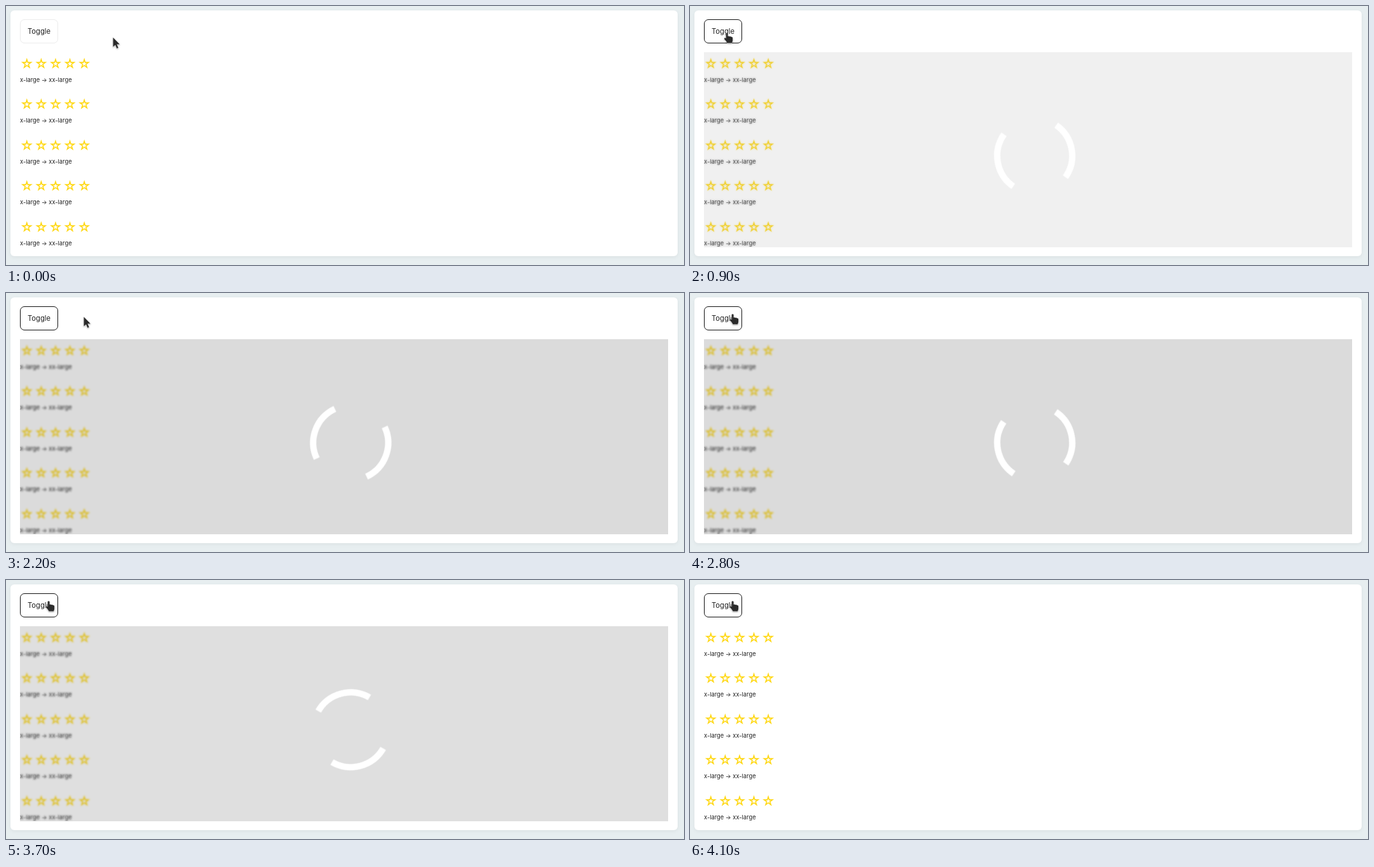
Animation of 1067x409 px, one loop 5000 ms. Source, as an HTML page:

```html
<!DOCTYPE html>
<html lang="en">
<head>
<meta charset="utf-8">
<title>Loading overlay</title>
<style>
  html, body { margin: 0; width: 100%; height: 100%; overflow: hidden; background: #e7eef0; }
  body { position: relative; font-family: Inter, sans-serif; color: #222; }
  svg { position: absolute; left: 0; top: 0; width: 1067px; height: 409px; }
  .card {
    position: absolute; left: 7px; top: 7px; width: 1050px; height: 388px;
    border-radius: 6px; background: #fff; box-shadow: 0 2px 6px rgba(0, 0, 0, .05);
  }
  .toggle {
    position: absolute; left: 22px; top: 21px; width: 60px; height: 38px;
    box-sizing: border-box; border: 1px solid #ebebeb; border-radius: 7px;
    font-size: 11.2px; line-height: 36px; text-align: center;
    animation: focus 5s step-end infinite;
  }
  .caption { font-size: 9.33px; fill: #222; }
  .star { fill: none; stroke: #ffd814; stroke-width: 1.6; }
  .overlay {
    position: absolute; left: 22px; top: 73px; width: 1020px; height: 308px;
    background: rgba(0, 0, 0, .14); backdrop-filter: blur(1.4px);
    opacity: 0; animation: fade 5s step-end infinite;
  }
  .ring {
    fill: none; stroke: #fff; stroke-width: 10; stroke-dasharray: 1;
    transform-origin: 542.5px 236.5px; animation: spin 5s infinite;
  }
  .pointer { stroke: #fff; stroke-linejoin: round; fill: #2b2b2b; paint-order: stroke;
    filter: drop-shadow(0 1px 1px rgba(0, 0, 0, .3)); animation: move 5s step-end infinite; }
  .arrow { animation: arrow 5s step-end infinite; }
  .hand { animation: hand 5s step-end infinite; }

  @keyframes focus { 0% { border-color: #ebebeb; } 8%, 100% { border-color: #111; } }
  /* ease-in over one second, quicker ease-out, sampled every 100 ms */
  @keyframes fade {
    0% { opacity: 0; }
    14% { opacity: .05; } 16% { opacity: .21; } 18% { opacity: .44; } 20% { opacity: .62; }
    22% { opacity: .76; } 24% { opacity: .855; } 26% { opacity: .92; } 28% { opacity: .965; }
    30% { opacity: .988; } 32% { opacity: .999; } 34% { opacity: 1; }
    74% { opacity: .917; } 76% { opacity: .47; } 78% { opacity: .19; } 80% { opacity: .05; }
    82%, 100% { opacity: 0; }
  }
  /* 30 degrees per tick, with one tick held at 2.4 s */
  @keyframes spin {
    0% { transform: rotate(-115deg); animation-timing-function: step-end; }
    14% { transform: rotate(-115deg); animation-timing-function: steps(17); }
    48% { transform: rotate(395deg); animation-timing-function: step-end; }
    52% { transform: rotate(425deg); animation-timing-function: steps(11); }
    74% { transform: rotate(750deg); animation-timing-function: steps(4); }
    82%, 100% { transform: rotate(870deg); }
  }
  @keyframes move {
    0% { transform: translate(168px, 49px); }
    2% { transform: translate(140px, 50px); }
    4% { transform: translate(92px, 46px); }
    6% { transform: translate(59px, 42px); }
    20% { transform: translate(72px, 39px); }
    22% { transform: translate(118px, 36px); }
    24% { transform: translate(152px, 36px); }
    26% { transform: translate(164px, 37px); }
    40% { transform: translate(158px, 37px); }
    42% { transform: translate(142px, 36px); }
    44% { transform: translate(122px, 37px); }
    46% { transform: translate(104px, 36px); }
    48% { transform: translate(89px, 36px); }
    52%, 100% { transform: translate(68px, 33px); }
  }
  @keyframes arrow {
    0% { visibility: visible; } 6% { visibility: hidden; }
    22% { visibility: visible; } 52%, 100% { visibility: hidden; }
  }
  @keyframes hand {
    0% { visibility: hidden; } 6% { visibility: visible; }
    22% { visibility: hidden; } 52%, 100% { visibility: visible; }
  }
</style>
</head>
<body>
<div class="card"></div>
<div class="toggle">Toggle</div>
<svg viewBox="0 0 1067 409">
  <defs>
    <path id="star" class="star" d="M0-6.9 1.55-2.14 6.56-2.13 2.51.82 4.06 5.58 0 2.64-4.06 5.58-2.51.82-6.56-2.13-1.55-2.14Z"/>
    <g id="row">
      <use href="#star" x="32.8" y="91.3"/>
      <use href="#star" x="55.4" y="91.3"/>
      <use href="#star" x="78" y="91.3"/>
      <use href="#star" x="100.6" y="91.3"/>
      <use href="#star" x="123.2" y="91.3"/>
      <text class="caption" x="22" y="120">x-large → xx-large</text>
    </g>
  </defs>
  <use href="#row"/>
  <use href="#row" y="64"/>
  <use href="#row" y="129"/>
  <use href="#row" y="193"/>
  <use href="#row" y="258"/>
</svg>
<div class="overlay"></div>
<svg viewBox="0 0 1067 409">
  <circle class="ring" cx="542.5" cy="236.5" r="59" pathLength="4"/>
  <g class="pointer">
    <path class="arrow" d="M.5.8V15.6L4 12.4 6.4 18 8.8 17 6.4 11.4H11Z"/>
    <path class="hand" d="M-2.4 1.2Q-1-.8.6 1.2V5.8Q2.4 5 3.4 6.2 5 5.6 6 6.8 8 6.5 8.2 8.6V12Q8 14.5 7 16.4H-.4Q-1.6 13.5-5 10.2-5.4 8-3.6 8.2L-2.4 9.2Z"/>
  </g>
</svg>
</body>
</html>
```
